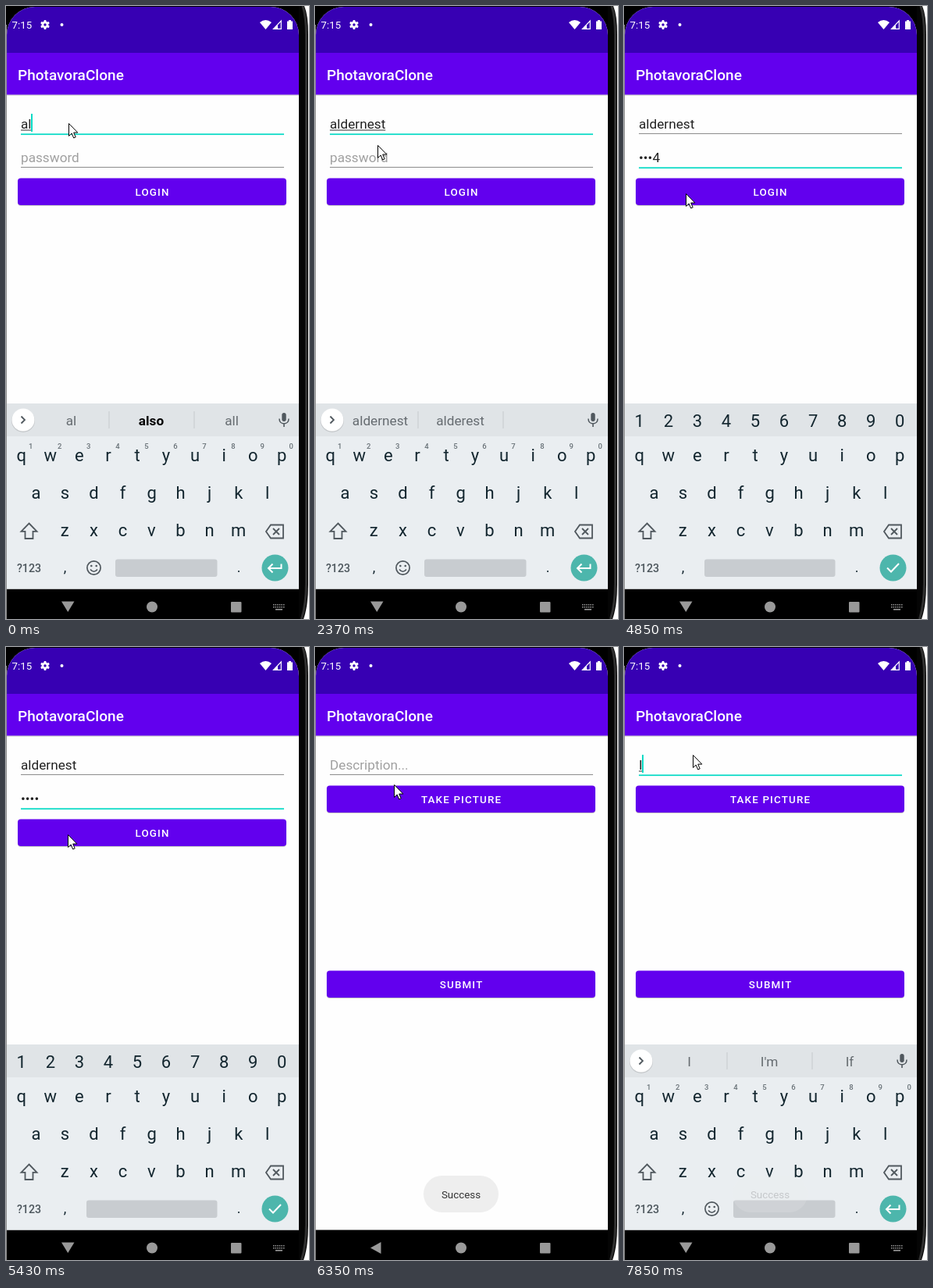
An HTML page that plays this animation: 388 by 785 pixels, repeating every 8000 ms.

```html
<!DOCTYPE html>
<html lang="en">
<head>
<meta charset="utf-8">
<title>Login demo</title>
<style>
  html, body { margin: 0; width: 100%; height: 100%; overflow: hidden; background: #000; }
  svg { display: block; width: 388px; height: 785px; font-family: Roboto, sans-serif; }
  text { white-space: pre; }
</style>
</head>
<body>
<svg id="stage" viewBox="0 0 388 785"></svg>
<script>
const LOOP = 8000;
const PURPLE = '#6200ee', TEAL = '#03dac5', ICON = '#50585e', KEY = '#13262f';
const FIELD_SIZE = 17.2, NAV_TOP = 746.5, KEY_STEP = 37.05;
const stage = document.getElementById('stage');
const ruler = document.createElement('canvas').getContext('2d');

// Each step lists only what changes at that time (ms).
const steps = [
  [0, { page: 1, user: 'al', pass: '', desc: '', focus: 'user', caret: 1, underline: 1, keys: 'words',
        words: ['al', 'also', 'all'], bold: 1, keyY: 0, keyAlpha: 1, mouse: [80, 150],
        toast: 0, pressed: 0, nextAlpha: 0, nextY: 0 }],
  [120, { user: 'ald', words: ['ald', 'and', 'all'] }],
  [320, { user: 'alde', words: ['alde', 'alder', 'aldea'] }],
  [520, { user: 'alder', words: ['alder', 'older', 'alders'], bold: 0 }],
  [720, { user: 'aldern', words: ['aldern', 'alderman', 'aldermen'] }],
  [910, { user: 'alderne', words: ['alderne', 'aldernes', 'aldern'] }],
  [1110, { user: 'aldernes', words: ['aldernes', 'alderness', 'alderns'] }],
  [1510, { user: 'aldernest', words: ['aldernest', 'alderest', ''] }],
  [2100, { caret: 0 }],
  [2250, { mouse: [80, 164] }],
  [2370, { mouse: [80, 178] }],
  [2520, { mouse: [80, 186] }],
  [2640, { caret: 1, mouse: [80, 187] }],
  [2790, { focus: 'pass', underline: 0 }],
  [2910, { keys: 'digits' }],
  [3060, { pass: '1' }],
  [3310, { pass: '•2' }],
  [3600, { pass: '••3' }],
  [3920, { pass: '•••4' }],
  [4460, { caret: 0 }],
  [4580, { mouse: [80, 205] }],
  [4730, { mouse: [79, 228] }],
  [4850, { mouse: [79, 240] }],
  [4970, { caret: 1 }],
  [5120, { pressed: 1 }],
  [5270, { pressed: .5 }],
  [5430, { pass: '••••', caret: 0, pressed: 0 }],
  [5840, { keyY: 20, nextAlpha: .2, nextY: 40 }],
  [5960, { keyY: 120, nextAlpha: .65, nextY: 14, mouse: [84, 226] }],
  [6110, { page: 2, keys: '', focus: '', toast: .3, mouse: [92, 205] }],
  [6230, { toast: .8, mouse: [98, 188] }],
  [6350, { toast: 1, mouse: [101, 176] }],
  [6470, { mouse: [99, 161] }],
  [6620, { mouse: [93, 145] }],
  [6770, { mouse: [88, 138] }],
  [7070, { focus: 'desc', caret: 1, keys: 'tools', keyY: 50, keyAlpha: .8 }],
  [7220, { keyY: 2, keyAlpha: .95 }],
  [7340, { keyY: 0, keyAlpha: 1 }],
  [7470, { toast: .97 }],
  [7590, { toast: .85 }],
  [7720, { desc: 'I', underline: 1, keys: 'words', words: ['I', "I'm", 'If'], toast: .55 }],
  [7850, { toast: .2 }],
];
let last = {};
const states = steps.map(([at, change]) => last = { ...last, ...change, at });

const rect = (x, y, w, h, fill, r = 0, extra = '') =>
  `<rect x="${x}" y="${y}" width="${w}" height="${h}" rx="${r}" fill="${fill}" ${extra}/>`;
const disc = (x, y, r, fill, extra = '') => `<circle cx="${x}" cy="${y}" r="${r}" fill="${fill}" ${extra}/>`;
const fillPath = (d, fill) => `<path d="${d}" fill="${fill}"/>`;
const line = (d, color, width = 1.8) =>
  `<path d="${d}" fill="none" stroke="${color}" stroke-width="${width}"/>`;
const text = (value, x, y, size, fill, extra = '') =>
  `<text x="${x}" y="${y}" font-size="${size}" fill="${fill}" ${extra}>${value}</text>`;
const label = (value, x, y, size, fill, weight = 400, spacing = 0) =>
  text(value, x + spacing / 2, y, size, fill,
    `text-anchor="middle" font-weight="${weight}" letter-spacing="${spacing}"`);
const group = (content, y = 0, alpha = 1) =>
  `<g transform="translate(0 ${y})" opacity="${alpha}">${content}</g>`;

function textWidth(value) {
  ruler.font = `${FIELD_SIZE}px Roboto, sans-serif`;
  return ruler.measureText(value).width;
}

function field(value, hint, baseline, focused, s) {
  const end = 19 + textWidth(value);
  const ruleY = baseline + 6;
  return text(value || hint, 19, baseline, FIELD_SIZE, value ? '#222' : '#a0a0a0') +
    (focused ? rect(19, ruleY + .4, 337, 1.7, TEAL) : rect(19, ruleY, 337, 1, '#8c8c8c')) +
    (focused && s.underline && value ? rect(19, baseline + 1.5, end - 19, 1, '#333') : '') +
    (focused && s.caret ? rect(Math.round(end - .5), baseline - 19, 2, 23, TEAL) : '');
}

function button(value, y, pressed = 0) {
  return rect(15, y + 1, 344, 34.5, '#000', 4, 'opacity=".22"') +
    rect(15, y, 344, 34.5, PURPLE, 4) +
    (pressed ? rect(15, y, 344, 34.5, '#fff', 4, `opacity="${pressed * .22}"`) : '') +
    label(value, 187, y + 22, 13.35, '#fff', 500, 1.19);
}

function page(number, s) {
  const body = number === 1
    ? field(s.user, '', 157, s.focus === 'user', s) +
      field(s.pass, 'password', 200, s.focus === 'pass', s) + button('LOGIN', 220.5, s.pressed)
    : field(s.desc, 'Description...', 157, s.focus === 'desc', s) +
      button('TAKE PICTURE', 177.5) + button('SUBMIT', 414.5);
  return rect(1, 0, 374, 747, '#fefefe') + rect(1, 113, 374, 1.7, '#000', 0, 'opacity=".18"') +
    rect(1, 0, 374, 60, '#3700b3') + rect(1, 60, 374, 53.5, PURPLE) +
    text('PhotavoraClone', 15, 94.5, 19.05, '#fff', 'font-weight="500"') + body;
}

function statusBar() {
  const teeth = [0, 60, 120].map(a =>
    rect(48.5, 18, 3, 12, '#fff', 1, `transform="rotate(${a} 50 24)"`)).join('');
  return text('7:15', 7.5, 29, 13.3, '#fff') + teeth +
    disc(50, 24, 3.2, 'none', 'stroke="#fff" stroke-width="2.4"') + disc(50, 24, 1.7, '#3700b3') +
    disc(71.5, 24, 2, '#fff') +
    fillPath('M325 21Q332.500 15 340 21L332.500 30Z', '#fff') +
    line('M342.500 29.300H352.300V19Z', '#fff', 1.2) + fillPath('M342 30L348 24V30Z', '#fff') +
    fillPath('M360 19.500H362V18H365V19.500H367V30H360Z', '#fff');
}

function microphone() {
  return rect(353.3, 521, 5.4, 11, ICON, 2.7) +
    line('M350 528.500C350 537 362 537 362 528.500M356 535V539', ICON, 1.6);
}

function keyRow(letters, x, y) {
  return [...letters].map((c, i) => label(c, x + KEY_STEP * i, y, 22, KEY)).join('');
}

function topStrip(s) {
  const divider = x => rect(x, 519, 1, 22, '#c6cacd');
  if (s.keys === 'digits') return keyRow('1234567890', 19.8, 538.5);
  const open = s.keys === 'words';
  const arrow = open ? 'M19.500 525.500L24 530L19.500 534.500' : 'M24 525.500L19.500 530L24 534.500';
  const knob = disc(22, 531, 15, '#000', 'opacity=".12"') + disc(22, 530, 14.5, '#fff') + line(arrow, ICON);
  if (open)
    return knob + divider(131.5) + divider(240.5) + microphone() + s.words.map((word, i) =>
      i === 1 && s.bold ? label(word, 186, 536.5, FIELD_SIZE, '#050505', 700)
        : label(word, [83.5, 186, 289][i], 536.5, FIELD_SIZE, '#656b70')).join('');
  return knob + disc(70, 528, 5, 'none', `stroke="${ICON}" stroke-width="1.800"`) +
    line('M73.500 531.500L79.500 537.500', ICON, 2.2) +
    line('M120 523H132Q133 523 133 524V531L127 537H120Q119 537 119 536V524Q119 523 120 523M133 531H127V537M122 531Q125 535 128 530', ICON, 1.6) +
    disc(123.3, 527, 1, ICON) + disc(128.7, 527, 1, ICON) +
    label('GIF', 179.7, 534.5, 13.8, '#666d72', 800, .8) + rect(228, 522, 16, 16, '#70777c', 1) +
    divider(268.5) + [297, 303, 309].map(x => disc(x, 530, 1.9, ICON)).join('') + microphone();
}

function keyboard(s) {
  const secret = s.keys === 'digits';
  const hints = secret ? '' : [...'1234567890'].map((d, i) =>
    label(d, 31.7 + KEY_STEP * i, 567, 9.5, '#687177', 500)).join('');
  const spaceX = secret ? 103 : 140;
  const smile = secret ? '' : disc(112.5, 719.5, 8.6, 'none', `stroke="${ICON}" stroke-width="1.700"`) +
    disc(109.3, 717, 1.3, ICON) + disc(115.7, 717, 1.3, ICON) +
    line('M108 721.500Q112.500 727 117 721.500', ICON, 1.6);
  const action = secret ? 'M337 719.500L342 724.500L352 714'
    : 'M352.500 714.500V720H336.500M341.500 714.500L336 720L341.500 725.500';
  return rect(1, 509, 374, 238, '#eaeef1') + rect(1, 509, 374, 42, '#e0e4e7') + topStrip(s) +
    keyRow('qwertyuiop', 19.8, 583) + hints + keyRow('asdfghjkl', 38.4, 630.5) + keyRow('zxcvbnm', 75.3, 679) +
    line('M29.500 662.500L39.500 672.800H34.500V682H24.500V672.800H19.500Z', ICON) +
    line('M339 664.500H355V681.500H339L333 673ZM342 669L350 677M350 669L342 677', ICON) +
    label('?123', 29.5, 724.5, 14.2, '#4c565c', 500) + label(',', 75.5, 725, 18, KEY) +
    label('.', 298, 725, 18, KEY) + smile + rect(spaceX, 708.5, 270.5 - spaceX, 22.5, '#c8ccd0', 3) +
    disc(344.5, 719.5, 17, '#4db6ac') + line(action, '#fff', 2);
}

function navBar(typing) {
  const tiny = [0, 1, 2, 3, 4, 5].map(i =>
    rect(342 + 2.6 * i, 766, 1.5, 1.5, '#999') + rect(342 + 2.6 * i, 769, 1.5, 1.5, '#999')).join('');
  return rect(1, NAV_TOP, 374, 785 - NAV_TOP, '#000') +
    fillPath(typing ? 'M71 762.500H87.500L79.250 776Z' : 'M84.500 762V777L71 769.500Z', '#999') +
    disc(187, 769.5, 7, '#999') + rect(288, 763, 13.5, 13.5, '#999', 1) +
    (typing ? tiny + rect(345, 772, 9, 1.6, '#999') : '');
}

function pointer([x, y]) {
  return `<path transform="translate(${x + .5} ${y + .5})" d="M0 0V16L3.700 12.600L6.200 18.500L8.700 17.400L6.200 11.600H11.300Z"
    fill="#fff" stroke="#000" stroke-width="1"/>`;
}

function bezel() {
  return rect(375, 0, 13, 785, '#fff') +
    fillPath('M375 0H382Q387 12 387 36V740Q387 768 381 785H375Z', '#050505') +
    line('M380 0Q384.500 14 384.500 38V738Q384.500 766 378.500 785', '#303030', 3) +
    rect(0, 24, 1, 761, '#8f8f8f');
}

function scene(s) {
  const toast = rect(139, 677, 96, 47, '#eee', 23.5) + label('Success', 187, 706, 13.35, '#333');
  const trayBottom = NAV_TOP + Math.min(s.keyY, 2);
  return `<defs>
      <clipPath id="screen"><path d="M1 785V37A36 36 0 0 1 37 1H339A36 36 0 0 1 375 37V785Z"/></clipPath>
      <clipPath id="tray"><rect x="1" y="500" width="374" height="${trayBottom - 500}"/></clipPath>
    </defs>` + rect(0, 0, 388, 785, '#000') +
    `<g clip-path="url(#screen)">` + page(s.page, s) +
    (s.page === 1 && s.nextAlpha ? group(page(2, { ...s, focus: '' }), s.nextY, s.nextAlpha) : '') +
    statusBar() + navBar(!!s.keys) +
    (s.keys ? `<g clip-path="url(#tray)">${group(keyboard(s), s.keyY, s.keyAlpha)}</g>` : '') +
    (s.toast ? group(toast, 0, s.toast) : '') + `</g>` + bezel() + pointer(s.mouse);
}

let shown = null;
const start = performance.now();
function tick() {
  const time = (performance.now() - start) % LOOP;
  const state = states.findLast(s => s.at <= time);
  if (state !== shown) {
    stage.innerHTML = scene(state);
    shown = state;
  }
  requestAnimationFrame(tick);
}
tick();
</script>
</body>
</html>
```
